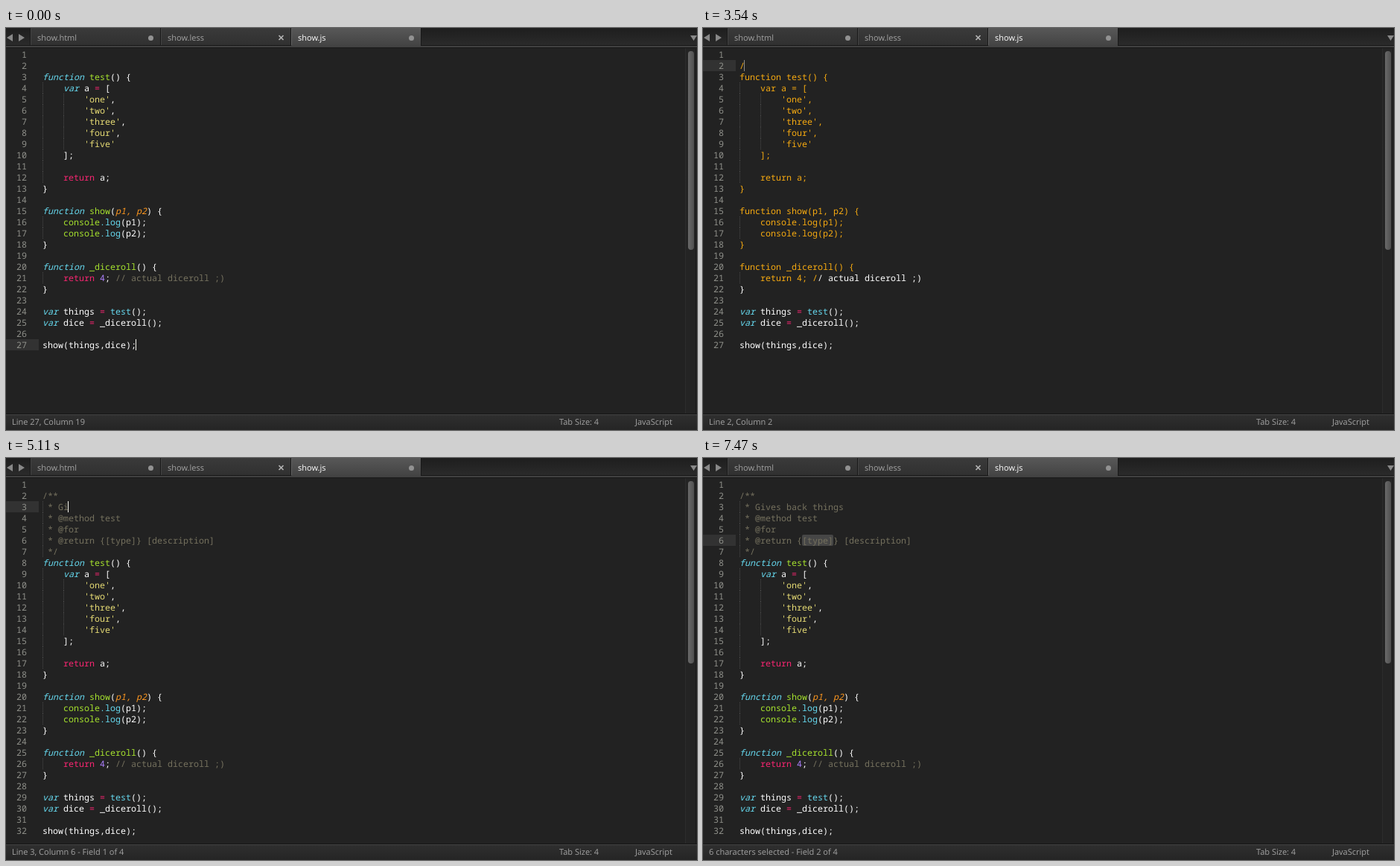
An HTML page that plays this animation: 928 px wide and 540 px high, repeating every 8 s.

```html
<!DOCTYPE html>
<html lang="en">
<head>
<meta charset="utf-8">
<title>Code editor</title>
<style>
  html, body { margin: 0; width: 100%; height: 100%; overflow: hidden; background: #222; }
  svg { display: block; width: 928px; height: 540px; }
  text { white-space: pre; text-rendering: geometricPrecision; }
  .ui { font: 11px "Open Sans", "Noto Sans", sans-serif; fill: #a3a3a3; }
  .ui .on { fill: #fff; }
  .code { font: 11.667px "Noto Sans Mono", "DejaVu Sans Mono", monospace; }
  .plain { fill: #fff; }
  .gutter { fill: #8f908a; }
  .comment { fill: #75715e; }
  .string { fill: #e6db74; }
  .storage { fill: #66d9ef; font-style: italic; }
  .keyword { fill: #f92672; }
  .name { fill: #a6e22e; }
  .param { fill: #fd971f; font-style: italic; }
  .call { fill: #66d9ef; }
  .number { fill: #ae81ff; }
  .regex { fill: #f6aa11; }
</style>
</head>
<body>
<svg viewBox="0 0 928 540">
  <defs>
    <linearGradient id="bar" x2="0" y2="1"><stop stop-color="#1e1e1e"/><stop offset="1" stop-color="#2b2b2b"/></linearGradient>
    <linearGradient id="tab" x2="0" y2="1"><stop stop-color="#3a3a3a"/><stop offset="1" stop-color="#303030"/></linearGradient>
    <linearGradient id="active" x2="0" y2="1"><stop stop-color="#585858"/><stop offset="1" stop-color="#434343"/></linearGradient>
    <linearGradient id="foot" x2="0" y2="1"><stop stop-color="#303030"/><stop offset="1" stop-color="#252525"/></linearGradient>
    <linearGradient id="grip"><stop stop-color="#6a6a6a"/><stop offset="1" stop-color="#505050"/></linearGradient>
  </defs>
  <rect width="928" height="540" fill="#222"/>

  <g class="ui">
    <rect width="928" height="24" fill="url(#bar)"/>
    <g id="tabs"></g>
    <rect y="23" width="383" height="1" fill="#181818"/>
    <rect x="557" y="23" width="371" height="1" fill="#181818"/>
    <rect y="24" width="928" height="3" fill="#414141"/>
    <rect y="26" width="928" height="1" fill="#191919"/>
    <path d="M9 8v10l-8-5zM17 8v10l8-5zM919 10h9l-4.500 7z" fill="#888"/>

    <rect x="912" y="27" width="16" height="492" fill="#242424"/>
    <path d="M912.500 28V518" stroke="#343434" stroke-dasharray="1 1"/>
    <path d="M926.500 28V518" stroke="#1a1a1a"/>
    <rect id="thumb" x="916" y="31" width="8" rx="4" fill="url(#grip)"/>

    <rect y="518" width="928" height="22" fill="url(#foot)"/>
    <path d="M0 518.500H928" stroke="#161616"/>
    <path d="M0 519.500H928" stroke="#444"/>
    <text id="status" x="8" y="533"></text>
    <text x="743" y="533">Tab Size: 4</text>
    <text x="845" y="533">JavaScript</text>
  </g>

  <g id="page" class="code"></g>
  <rect id="caret" width="1" height="15" fill="#f8f8f0"/>
</svg>

<script>
const LOOP = 8000, LEFT = 49, TOP = 28, CHAR = 7, ROW = 15;
const $ = id => document.getElementById(id);

const BODY = `function test() {
    var a = [
        'one',
        'two',
        'three',
        'four',
        'five'
    ];

    return a;
}

function show(p1, p2) {
    console.log(p1);
    console.log(p2);
}

function _diceroll() {
    return 4; // actual diceroll ;)
}

var things = test();
var dice = _diceroll();

show(things,dice);`.split('\n');

const TOKEN = new RegExp([
  '(?<comment>//.*)',
  "(?<string>'[^']*')",
  '(?<storage>\\b(?:var|function)\\b)',
  '(?<keyword>\\breturn\\b|=)',
  '(?<name>(?<=function )\\w+|console)',
  '(?<param>p1, p2)',
  '(?<call>\\.log|test(?=\\(\\);))',
  '(?<number>\\b\\d+\\b)',
  '(?<plain>\\w+|[^\\s\\w]+)'
].join('|'), 'g');

const docBlock = text => ['/**', ' * ' + text, ' * @method test', ' * @for',
  ' * @return {[type]} [description]', ' */'];

// Each step changes some fields of the editor state at a given time.
const steps = [];
let last = { head: [''], line: 27, col: 18, alpha: 1, mode: 'code', from: null, field: 0 };
const at = (time, change) => steps.push({ ...(last = { ...last, ...change }), time });
const fade = (...pairs) => pairs.forEach(([time, alpha]) => at(time, { alpha }));
const move = (time, line) => at(time, { line, col: 0, alpha: 1 });
const type = (time, head, mode) => at(time, { head: [head], mode, col: head.length, alpha: 1 });
const describe = (time, length) => {
  const text = 'Gives back things'.slice(0, length);
  at(time, { head: docBlock(text), col: 3 + length, from: null, alpha: 1 });
};

at(0, {});
fade([270, .5], [390, 0], [790, .3], [910, .65], [1030, 1], [1180, .5], [1300, 0]);
move(1450, 1);
fade([1880, .5]);
move(2000, 2);
move(2130, 3);
move(2530, 2);
fade([2960, .5]);
type(3110, '/', 'regex');
fade([3540, .5]);
type(3660, '/*', 'comment');
type(3810, '/**', 'comment');
fade([4200, .5]);
at(4320, { head: docBlock('[test description]'), mode: 'doc', line: 3, from: 3, col: 21, field: 1, alpha: 1 });
fade([4720, .5], [4840, 0]);
[[4990, 1], [5110, 2], [5230, 3], [5380, 4], [5530, 5], [5680, 6], [5830, 7], [5980, 9],
 [6100, 10], [6250, 12], [6400, 13], [6520, 14], [6670, 15], [6790, 17]]
  .forEach(([time, length]) => describe(time, length));
at(7070, { line: 6, from: 12, col: 18, field: 2 });
fade([7470, 0]);

const rowTop = row => TOP + ROW * row;
const label = (x, y, text, kind, extra = '') =>
  `<text x="${x}" y="${y}" class="${kind}" ${extra}>${text}</text>`;

// Words sit on the character grid.
const words = (text, row, kind, col = 0) => [...text.matchAll(/\S+/g)]
  .map(m => label(LEFT + CHAR * (col + m.index), rowTop(row) + 12, m[0], kind)).join('');

function highlight(text, row) {
  return [...text.matchAll(TOKEN)].map(m => {
    const kind = Object.keys(m.groups).find(k => m.groups[k] !== undefined);
    return words(m[0], row, kind, m.index);
  }).join('');
}

function bodyRows(state) {
  let open = state.mode === 'regex';
  return BODY.map((text, i) => {
    const row = i + 1 + state.head.length;
    if (state.mode === 'comment') return words(text, row, 'comment');
    if (!open) return highlight(text, row);
    const end = text.indexOf('/') + 1;
    if (!end) return words(text, row, 'regex');
    open = false;
    return words(text.slice(0, end), row, 'regex') + words(text.slice(end), row, 'plain', end);
  }).join('');
}

function guides(lines) {
  const indent = text => text ? text.search(/\S/) : 0;
  return lines.map((text, row) => {
    const size = text ? indent(text) : Math.min(indent(lines[row - 1] || ''), indent(lines[row + 1] || ''));
    let out = '';
    for (let n = 0; n < size; n += 4)
      out += `<path d="M${LEFT + CHAR * n + .5} ${rowTop(row)}v15" stroke="#4a4a4a" stroke-dasharray="1 1"/>`;
    return out;
  }).join('');
}

function selection({ from, col, line, head }) {
  if (from === null) return '';
  const y = rowTop(line - 1), x = LEFT + CHAR * from;
  const spaces = [...head[line - 2].slice(from, col).matchAll(/ /g)]
    .map(m => `<rect x="${x + CHAR * m.index + 3}" y="${y + 8}" width="1" height="1" fill="#75715e"/>`);
  return `<rect x="${x}" y="${y}" width="${CHAR * (col - from)}" height="15" rx="2" fill="#464646"/>` + spaces.join('');
}

function statusText({ from, col, line, field }) {
  const place = from === null ? `Line ${line}, Column ${col + 1}` : `${col - from} characters selected`;
  return place + (field ? ` - Field ${field} of 4` : '');
}

function draw(state) {
  const lines = ['', ...state.head, ...BODY];
  const headKind = state.mode === 'regex' ? 'regex' : 'comment';
  const top = rowTop(state.line - 1);
  $('page').innerHTML =
    `<rect y="${top}" width="44" height="15" fill="#323232"/>` +
    lines.map((_, row) => label(28, rowTop(row) + 12, row + 1, 'gutter', 'text-anchor="end"')).join('') +
    guides(lines) + selection(state) +
    state.head.map((text, i) => words(text, i + 1, headKind)).join('') +
    bodyRows(state);
  $('caret').setAttribute('x', LEFT - 1 + CHAR * state.col);
  $('caret').setAttribute('y', top);
  $('caret').setAttribute('opacity', state.alpha);
  $('thumb').setAttribute('height', lines.length > 27 ? 245 : 267);
  $('status').textContent = statusText(state);
}

$('tabs').innerHTML = ['show.html', 'show.less', 'show.js'].map((name, i) => {
  const x = 33 + 175 * i, on = i === 2;
  const mark = i === 1
    ? `<path d="M${x + 158.5} 10l6 6m0 -6l-6 6" stroke="#b5b5b5" stroke-width="1.700"/>`
    : `<circle cx="${x + 161.5}" cy="13.500" r="3.500" fill="#929292"/>`;
  return `<rect x="${x}" width="174" height="24" fill="url(#${on ? 'active' : 'tab'})"/>` +
    `<path d="M${x - .5} 0v23M${x + 174.5} 0v23" stroke="#191919"/>` +
    `<path d="M${x + .5} 1v22" stroke="${on ? '#626262' : '#444'}"/>` +
    label(x + 9, 17, name, on ? 'on' : '') + mark;
}).join('');

let shown;
function frame(now) {
  const time = now % LOOP;
  const state = steps.findLast(step => step.time <= time) || steps[0];
  if (state !== shown) draw(shown = state);
  requestAnimationFrame(frame);
}
frame(0);
</script>
</body>
</html>
```
